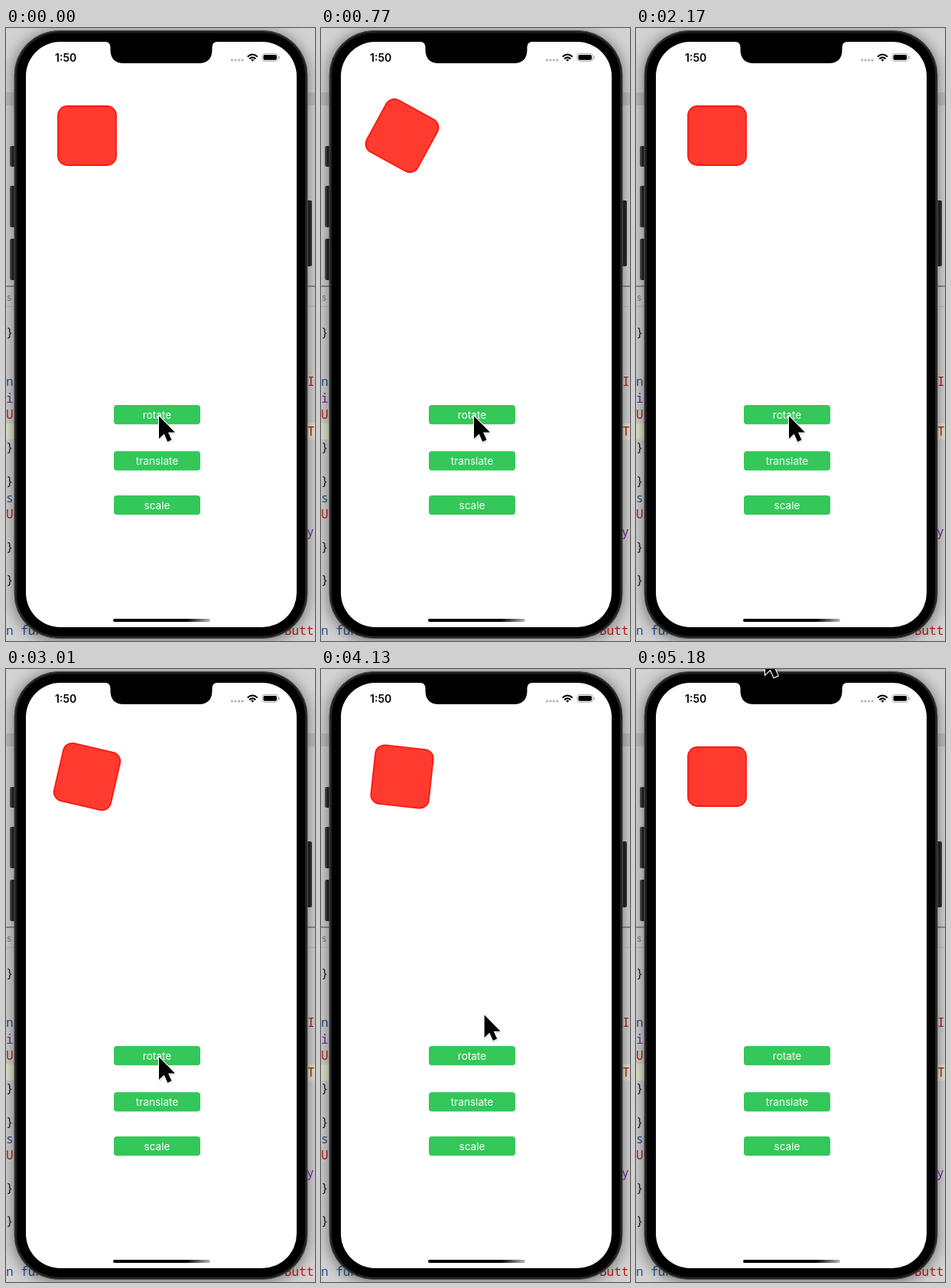
These frames come from a looping animation (404 px wide and 800 px high, 5250 ms). An HTML page:

```html
<!DOCTYPE html>
<html lang="en">
<head>
<meta charset="utf-8">
<title>Rotate demo</title>
<style>
  html, body { margin: 0; width: 100%; height: 100%; overflow: hidden; background: #ccc; }
  svg { display: block; width: 404px; height: 800px; }
  .code { font: 16px "Noto Sans Mono", monospace; white-space: pre; }
  .label { font: 13.6px Inter, sans-serif; fill: #fff; text-anchor: middle; }
  .clock { font: 600 14px Inter, sans-serif; }
</style>
</head>
<body>
<svg viewBox="0 0 404 800" xmlns="http://www.w3.org/2000/svg">
  <defs>
    <filter id="blur" x="-20%" y="-20%" width="140%" height="140%"><feGaussianBlur stdDeviation="9"/></filter>
    <filter id="soft" x="-50%" y="-50%" width="200%" height="200%"><feGaussianBlur stdDeviation="1.3"/></filter>
    <linearGradient id="home"><stop offset=".75"/><stop offset="1" stop-color="#bbb"/></linearGradient>
    <linearGradient id="side"><stop offset="0" stop-color="#555"/><stop offset=".5" stop-color="#161616"/><stop offset="1" stop-color="#333"/></linearGradient>
  </defs>

  <!-- editor behind the phone -->
  <rect width="404" height="800" fill="#d2d2d2"/>
  <rect y="84" width="404" height="17" fill="#bebebe"/>
  <rect y="336" width="404" height="2" fill="#8c8c8c"/>
  <rect y="363" width="404" height="1" fill="#bdbdbd"/>
  <rect y="516" width="404" height="21" fill="#e2e6cb"/>
  <text x="-2" y="356" font-family="Inter, sans-serif" font-size="11" fill="#777">.s</text>
  <g id="code" class="code"></g>
  <rect x="9" y="4" width="386" height="796" rx="58" opacity=".42" filter="url(#blur)"/>

  <!-- phone -->
  <g fill="url(#side)">
    <rect x="5" y="154" width="8" height="27" rx="2"/>
    <rect x="5" y="206" width="8" height="54" rx="2"/>
    <rect x="5" y="275" width="8" height="54" rx="2"/>
    <rect x="392" y="225" width="8" height="86" rx="2"/>
  </g>
  <rect x="11" y="3.5" width="383" height="793" rx="58" fill="#222" stroke="#4a4a4a"/>
  <rect x="14" y="6.5" width="377" height="787" rx="55"/>
  <rect x="26" y="18" width="354" height="764" rx="45" fill="#fff"/>
  <path d="M130 17V18Q136 18 136.500 25V29Q137 46 154 46H252Q269 46 269.500 29V25Q270 18 276 18V17Z"/>

  <text class="clock" x="64" y="43.500">1:50</text>
  <g fill="#b5b5b5">
    <rect x="294" y="40.500" width="3" height="3" rx="1"/><rect x="298.500" y="40.500" width="3" height="3" rx="1"/>
    <rect x="303" y="40.500" width="3" height="3" rx="1"/><rect x="307.500" y="40.500" width="3" height="3" rx="1"/>
  </g>
  <g fill="none" stroke="#000" stroke-width="2">
    <path d="M315.800 37.500Q322.300 31.500 328.800 37.500M318.200 40.200Q322.300 36.500 326.400 40.200"/>
    <path d="M320.200 41.500Q322.300 40 324.400 41.500L322.300 43.800Z" fill="#000" stroke="none"/>
  </g>
  <rect x="335" y="33.500" width="20.500" height="9.800" rx="3" fill="none" stroke="#aaa"/>
  <rect x="336.500" y="35" width="17.500" height="6.800" rx="1.700"/>
  <rect x="356.500" y="36.500" width="1.300" height="4" rx=".6" fill="#aaa"/>
  <rect x="140" y="771" width="127" height="4" rx="2" fill="url(#home)"/>

  <rect id="box" x="68" y="102" width="76" height="77" rx="12" fill="#ff3b30" stroke="#ff1710" stroke-width="1.800"/>
  <g id="buttons"></g>
  <circle id="ring" cx="196" cy="506" fill="none" stroke="#8fa5a5" stroke-width="3"/>

  <g id="cursor">
    <path d="M200 508V538L207 531.500L211.500 541.500L217.500 539L213 529.500H221.500Z" opacity=".3" filter="url(#soft)"/>
    <path d="M200 506.500V536L206.700 529.800L211.300 540L216.600 537.600L212 527.800H221Z" stroke="#fff" stroke-width="2.200" paint-order="stroke"/>
  </g>
</svg>
<script>
const LOOP = 5250, STEP = 70, TURN = 0.5 * 180 / Math.PI;
const PRESSES = [230, 1480, 2715, 3743];
const RELEASE = 107, SPIN = 400, RING = 300;
const $ = id => document.getElementById(id);

function add(parent, tag, attrs, text = "") {
  const node = document.createElementNS("http://www.w3.org/2000/svg", tag);
  for (const key in attrs) node.setAttribute(key, attrs[key]);
  node.textContent = text;
  return parent.appendChild(node);
}

const BLUE = "#23508c", PURPLE = "#6c29a8", RED = "#b81d14", INK = "#222";
[
  [0, 403, "}", INK], [0, 467, "n", BLUE], [0, 489, "i", PURPLE], [0, 510, "U", RED],
  [0, 553, "}", INK], [0, 597, "}", INK], [0, 619, "s", BLUE], [0, 640, "U", RED],
  [0, 683, "}", INK], [0, 726, "}", INK], [0, 792, "n func", BLUE],
  [394, 467, "I", RED], [394, 532, "T", RED], [393, 663, "y", PURPLE], [364, 792, "Butt", RED]
].forEach(([x, y, text, fill]) => add($("code"), "text", { x, y, fill }, text));

const labels = [["rotate", 492], ["translate", 552.3], ["scale", 610]].map(([name, y]) => {
  add($("buttons"), "rect", { x: 141, y, width: 113, height: 25.3, rx: 4, fill: "#34c759" });
  return add($("buttons"), "text", { class: "label", x: 197.5, y: y + 17.6 }, name);
});

const clamp = v => Math.min(1, Math.max(0, v));
const ease = v => v * v * (3 - 2 * v);

// Each tap toggles the square between upright and turned.
function angleAt(t) {
  return PRESSES.reduce((sum, press, i) => {
    const p = ease(clamp((t - press - RELEASE) / SPIN));
    return sum + (i % 2 ? -p : p) * TURN;
  }, 0);
}

// The pointer leaves over the top edge, then arcs back to the left.
function cursorAt(t) {
  if (t < 4410) {
    const p = ease(clamp((t - 4060) / 350));
    return [131 * p, -530 * p];
  }
  const p = clamp((t - 4410) / 770);
  return [131 - 162 * ease(p), -530 + p - 60 * p * (1 - p)];
}

function render(t) {
  $("box").setAttribute("transform", `rotate(${angleAt(t)} 106 140.5)`);
  $("cursor").setAttribute("transform", `translate(${cursorAt(t)})`);
  const age = t - (PRESSES.findLast(press => press <= t) ?? -LOOP);
  const p = clamp(age / RING);
  $("ring").setAttribute("r", 13 + 24 * p);
  $("ring").setAttribute("opacity", 0.35 * (1 - p));
  labels[0].setAttribute("opacity", age < RELEASE ? 0.7 : 1);
}

const start = performance.now();
function tick() {
  const t = (performance.now() - start) % LOOP;
  render(Math.floor(t / STEP) * STEP);
  requestAnimationFrame(tick);
}
tick();
</script>
</body>
</html>
```
